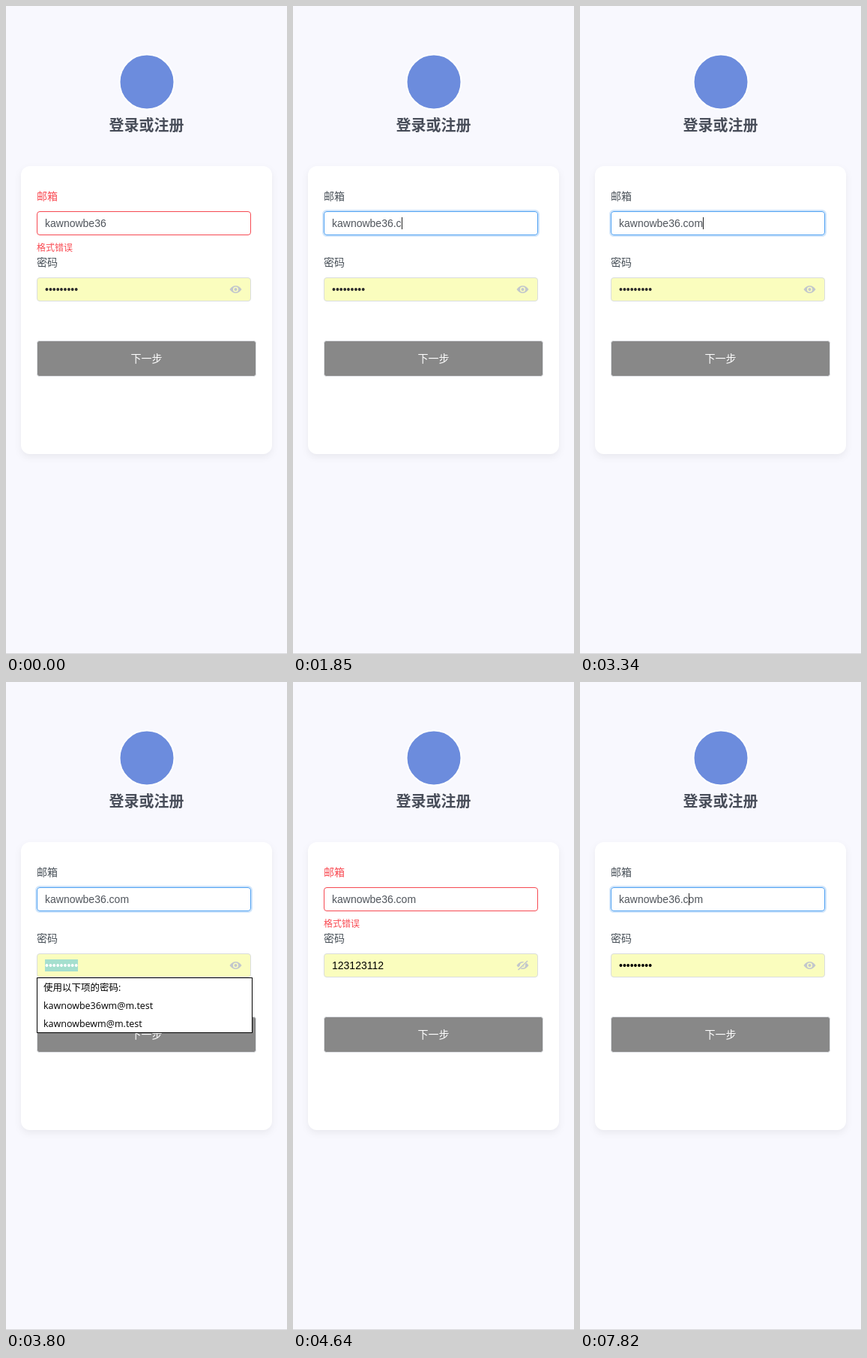
These frames come from a looping animation (375 by 862 pixels, 8000 ms). An HTML page:

```html
<!DOCTYPE html>
<html lang="zh-CN">
<head>
<meta charset="utf-8">
<title>登录或注册</title>
<style>
  html, body { margin: 0; width: 100%; height: 100%; overflow: hidden; background: #f8f8fe; }
  svg { display: block; }
  text { font-family: "Noto Sans CJK SC", "Noto Sans CJK", sans-serif; font-size: 14px; white-space: pre; }
  .field { font-family: "Liberation Sans", Arial, sans-serif; }
  .halo { fill: none; stroke: #d0e5fb; stroke-width: 2; }
  .list text { font-family: "Open Sans", "Noto Sans CJK SC", "Noto Sans CJK", sans-serif; font-size: 12.5px; fill: #000; }
  .list rect { fill: #fff; stroke: #000; }
  #card { filter: drop-shadow(0 4px 5px rgba(0, 0, 0, .06)); }
</style>
</head>
<body>
<svg width="375" height="862" viewBox="0 0 375 862">
  <rect width="375" height="862" fill="#f8f8fe"/>
  <rect y="861" width="375" height="1" fill="#d8d8dc"/>
  <circle cx="188" cy="101" r="36.5" fill="#6c8cdd" stroke="#fff" stroke-width="2"/>
  <text x="187.5" y="166" text-anchor="middle" style="font-size:20px;font-weight:700" fill="#484d59">登录或注册</text>
  <rect id="card" x="20" y="213" width="335" height="383" rx="12" fill="#fff"/>

  <text id="mailLabel" x="41" y="258">邮箱</text>
  <rect id="mailHalo" class="halo" x="40" y="272" width="288" height="34" rx="5"/>
  <rect id="mailBox" x="41.5" y="273.5" width="285" height="31" rx="3.5" fill="#fff"/>
  <text id="mail" class="field" x="52" y="294" fill="#50555c"></text>
  <rect id="caret" y="281" width="1" height="16" fill="#222"/>
  <text id="error" x="41" y="326" style="font-size:12px" fill="#f94a52">格式错误</text>

  <text x="41" y="346" fill="#485058">密码</text>
  <rect id="passHalo" class="halo" x="40" y="360" width="288" height="34" rx="5"/>
  <rect id="passBox" x="41.5" y="361.5" width="285" height="31" rx="3.5" fill="#fafdbe"/>
  <rect id="selection" x="52" y="369" width="44" height="16" fill="#a5dfce"/>
  <text id="pass" class="field" x="52" y="382"></text>
  <g fill="#c2c7cc">
    <path d="M298.5 377Q302 372 306.5 372T314.5 377Q311 382 306.5 382T298.5 377Z"/>
    <circle cx="306.5" cy="377" r="2.8" stroke="#fafdbe" stroke-width="1.5"/>
    <g id="slash" fill="none">
      <path d="M300 382.5L312.5 370.5" stroke="#fafdbe" stroke-width="3.6"/>
      <path d="M300.5 383L313 371" stroke="#c2c7cc" stroke-width="1.6"/>
    </g>
  </g>

  <rect x="41.5" y="445.5" width="292" height="47" rx="3" fill="#888" stroke="#dcdee2"/>
  <text x="187.5" y="474" text-anchor="middle" fill="#fff">下一步</text>

  <g id="mailList" class="list">
    <rect x="41.5" y="305.5" width="287" height="25"/>
    <text x="50" y="323" style="font-size:12.3px;font-weight:700">kawnowbe36wm@m.test</text>
  </g>
  <g id="passList" class="list">
    <rect x="41.5" y="393.5" width="287" height="73"/>
    <text x="50" y="411">使用以下项的密码:</text>
    <text x="50" y="435">kawnowbe36wm@m.test</text>
    <text x="50" y="459">kawnowbewm@m.test</text>
  </g>
</svg>
<script>
const LOOP = 8000;
const BLINK = 470;
const FADE_STEP = 70;
const START_TEXT = "kawnowbe36";
const RED = [246, 74, 82], BLUE = [80, 162, 242], GREY = [218, 221, 222];

// Moments at which the user acts, in ms
const FOCUS = 770, SUGGEST = 2790, RETYPE = 2940, LEAVE = 3800;
const REVEAL = 4640, CONCEAL = 5180, REFOCUS = 6420;

// Bursts of evenly spaced keys: "<" is backspace, "[" is arrow left
const bursts = [
  { start: 1560, gap: 290, keys: ".c" },
  { start: 2560, gap: 150, keys: "<<" },
  { start: RETYPE, gap: 133, keys: ".com" },
  { start: 7670, gap: 150, keys: "[[" }
];

const el = {};
document.querySelectorAll("[id]").forEach(e => el[e.id] = e);

const within = (t, from, to) => t >= from && t < to;
const mix = (a, b, p) => `rgb(${a.map((v, i) => Math.round(v + (b[i] - v) * p))})`;
const set = (e, name, value) => e.setAttribute(name, value);
const show = (e, on) => set(e, "visibility", on ? "visible" : "hidden");

// Rises from 0 to 1 in a few hard steps
function fade(t, start, steps) {
  return Math.min(1, Math.max(0, Math.floor((t - start) / FADE_STEP) / steps));
}

// Replays the keys pressed up to t
function typed(t) {
  let text = START_TEXT, caret = text.length;
  let last = t >= REFOCUS ? REFOCUS : FOCUS;
  for (const { start, gap, keys } of bursts) {
    [...keys].forEach((key, i) => {
      const time = start + i * gap;
      if (time > t) return;
      last = Math.max(last, time);
      if (key === "[") return caret--;
      text = key === "<" ? text.slice(0, -1) : text + key;
      caret = text.length;
    });
  }
  return { text, caret, last };
}

function draw(t) {
  const { text, caret, last } = typed(t);
  const focused = within(t, FOCUS, LEAVE) || t >= REFOCUS;
  el.mail.textContent = text;
  set(el.caret, "x", Math.round(52 + el.mail.getSubStringLength(0, caret)));
  show(el.caret, focused && (t - last) % (2 * BLINK) < BLINK);

  const left = fade(t, LEAVE, 3);
  const mailFocus = fade(t, FOCUS, 2) - left + fade(t, REFOCUS, 2);
  const invalid = t < FOCUS ? 1 : t < REFOCUS ? left : 0;
  set(el.mailBox, "stroke", mix(RED, BLUE, mailFocus));
  set(el.mailHalo, "opacity", mailFocus);
  set(el.mailLabel, "fill", invalid ? "#f94a52" : "#485058");
  set(el.error, "opacity", invalid);

  const choosing = within(t, LEAVE, REVEAL);
  const plain = within(t, REVEAL, CONCEAL);
  const passFocus = choosing ? left : 0;
  set(el.passBox, "stroke", mix(GREY, BLUE, passFocus));
  set(el.passHalo, "opacity", passFocus);
  el.pass.textContent = plain ? "123123112" : "•".repeat(9);
  set(el.pass, "fill", choosing ? "#fff" : t < LEAVE ? "#2c2c2c" : "#000");
  show(el.selection, choosing);
  show(el.slash, plain);
  show(el.mailList, within(t, SUGGEST, RETYPE));
  show(el.passList, choosing);
}

const begin = performance.now();
function tick() {
  draw((performance.now() - begin) % LOOP);
  requestAnimationFrame(tick);
}
tick();
</script>
</body>
</html>
```
